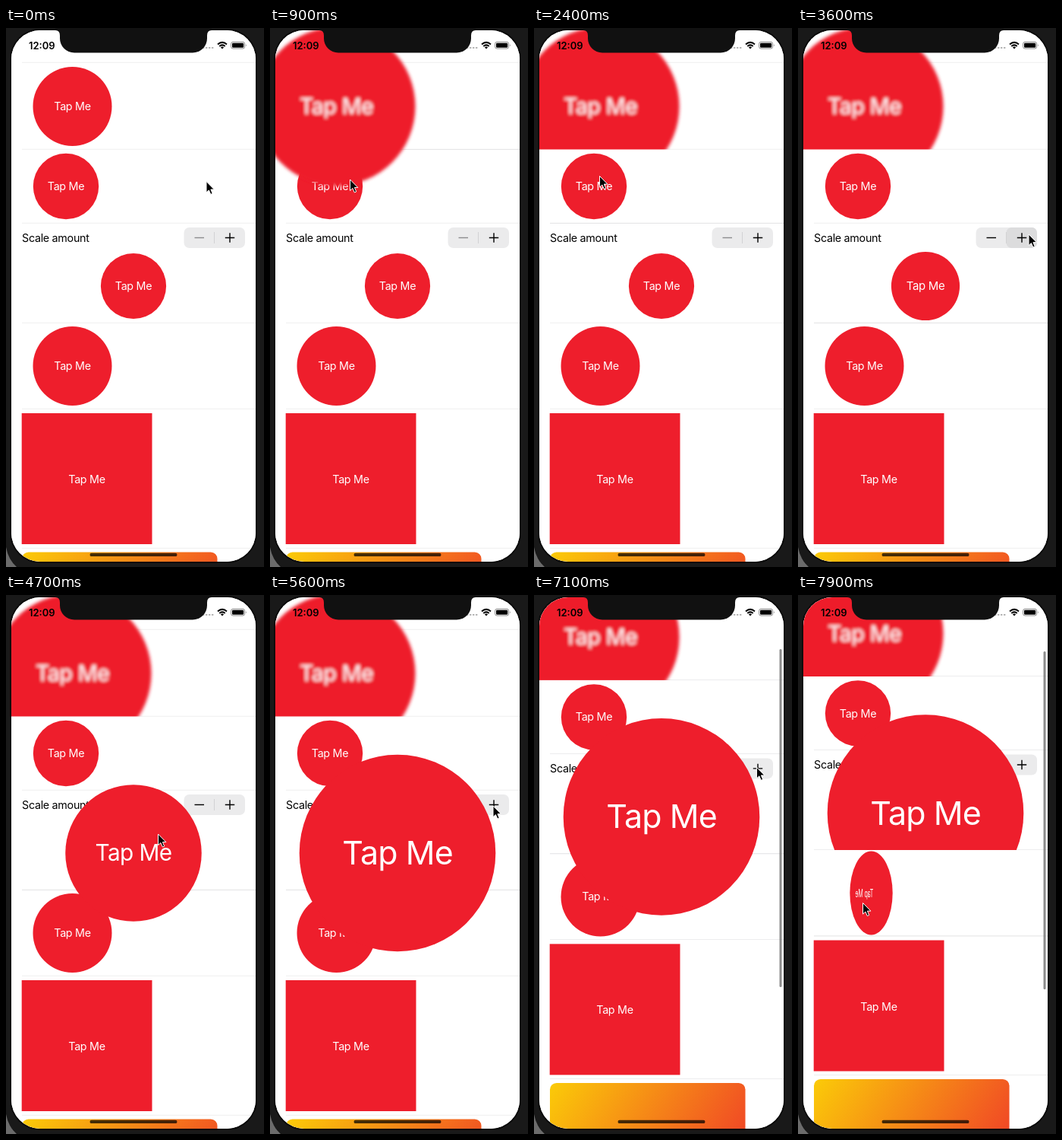
Recreate the animation shown at these times as an HTML page. Size 340 px wide and 708 px high, loop 8000 ms.

```html
<!DOCTYPE html>
<html lang="en">
<head>
<meta charset="utf-8">
<title>Tap Me</title>
<style>
  html, body { margin: 0; width: 100%; height: 100%; overflow: hidden; background: #191919; }
  svg { display: block; width: 340px; height: 708px; }
  text { font: 400 14.3px Inter, Roboto, sans-serif; letter-spacing: -.02em; }
  .tap { fill: #fff; text-anchor: middle; }
  .red { fill: #ee1e2c; }
  .time { font-weight: 600; font-size: 13px; letter-spacing: 0; }
</style>
</head>
<body>
<svg viewBox="0 0 340 708">
  <defs>
    <clipPath id="screen"><rect x="7" y="3" width="322" height="698" rx="38"/></clipPath>
    <filter id="soften" x="-30%" y="-30%" width="160%" height="160%">
      <feGaussianBlur id="blur" stdDeviation="0"/>
    </filter>
    <linearGradient id="sunset" gradientUnits="userSpaceOnUse" x1="21" y1="688.5" x2="278" y2="860">
      <stop stop-color="#fbcb08"/><stop offset="1" stop-color="#ee2a2c"/>
    </linearGradient>
  </defs>
  <rect width="340" height="708" fill="#191919"/>
  <path d="M0 682Q3 698 14 708H0Z" fill="#6b6b6b"/>
  <rect x="5" y="1" width="326" height="702" rx="40" fill="#0b0b0b"/>
  <g clip-path="url(#screen)">
    <rect width="340" height="708" fill="#fff"/>
    <g id="list"></g>
    <rect id="scroller" x="323.5" width="3" rx="1.5" fill="#777"/>
    <g id="status">
      <text class="time" x="30" y="27.5">12:09</text>
      <path d="M259 26h15" stroke="#b5b5b5" stroke-width="2.2" stroke-dasharray="2.4 1.6"/>
      <g fill="none" stroke="#000" stroke-width="2">
        <path d="M279 21.4Q285 16.4 291 21.4M281.3 24Q285 20.8 288.7 24"/>
      </g>
      <path d="M285 27.6L282.9 25.4Q285 23.7 287.1 25.4Z"/>
      <rect x="296.6" y="18.3" width="18" height="8.8" rx="2.5" fill="none" stroke="#000" stroke-opacity=".45"/>
      <rect x="298" y="19.7" width="15.2" height="6" rx="1.3"/>
      <path d="M316 21.2q1.6 1.5 0 3z" fill-opacity=".5"/>
    </g>
    <rect x="110.5" y="689.7" width="115" height="4.4" rx="2.2" fill-opacity=".72"/>
  </g>
  <path d="M65 0V3q6 0 6 7v3a19 19 0 0 0 19 19.5H246a19 19 0 0 0 19-19.5v-3q0-7 6-7V0Z" fill="#111"/>
  <path id="cursor" d="M0 0V14.6L3.4 11.5L5.8 17L8.2 16L5.9 10.6H10.4Z" stroke="#fff" stroke-width="1" stroke-linejoin="round"/>
</svg>
<script>
const LOOP = 8000;
const $ = id => document.getElementById(id);
const clamp = v => Math.max(0, Math.min(1, v));

// cubic-bezier(.42, 0, .58, 1)
function easeInOut(p) {
  p = clamp(p);
  let lo = 0, hi = 1;
  for (let i = 0; i < 20; i++) {
    const u = (lo + hi) / 2, v = 1 - u;
    if (1.26 * u * v * v + 1.74 * u * u * v + u * u * u < p) lo = u; else hi = u;
  }
  return lo * lo * (3 - 2 * lo);
}

// Interpolating spring with stiffness 5 and damping 1
function spring(s) {
  if (s <= 0) return 0;
  const w = Math.sqrt(4.75);
  return 1 - Math.exp(-s / 2) * (Math.cos(w * s) + Math.sin(w * s) / (2 * w));
}

// Keys are [time, ...values]
function along(keys, t) {
  let i = 0;
  while (i < keys.length - 2 && t >= keys[i + 1][0]) i++;
  const [a, b] = [keys[i], keys[i + 1]];
  const p = easeInOut((t - a[0]) / (b[0] - a[0]));
  return a.slice(1).map((v, k) => v + (b[k + 1] - v) * p);
}

const label = '<text class="tap" y="5">Tap Me</text>';
const button = (id, x, y, r) =>
  `<g id="${id}" transform="translate(${x} ${y})"><circle class="red" r="${r}"/>${label}</g>`;

const stepper = `
  <text x="21" y="280.5">Scale amount</text>
  <rect x="234.5" y="262" width="80.5" height="27" rx="7" fill="#ebebec"/>
  <rect id="pressed" x="274.5" y="262" width="40.5" height="27" rx="7" fill="#dcdcdd"/>
  <path d="M274.5 268v15" stroke="#d2d2d4"/>
  <path id="minus" d="M248.5 275.5h12.5" stroke-width="1.4"/>
  <path d="M288.8 275.5h12.4M295 269.3v12.4" stroke="#000" stroke-width="1.4"/>`;

const spin = `
  <ellipse id="disc" class="red"/>
  <g id="spinLabel">${label}</g>`;

const rows = [
  { top: -60, bottom: 45.5, body: '' },
  { top: 45.5, bottom: 159.5, tap: 430, body: `<g filter="url(#soften)">${button('grow', 87.5, 103, 52)}</g>` },
  { top: 159.5, bottom: 256.5, tap: 1300, body: button('still', 79, 208, 43.2) },
  { top: 256.5, bottom: 387.5, tap: 3450, body: stepper + button('scaled', 168, 339, 43.1) },
  { top: 387.5, bottom: 500.5, tap: 7500, body: spin },
  { top: 500.5, bottom: 683.5, body: `<rect class="red" x="20.7" y="506" width="171.8" height="172"/>
    <g transform="translate(106.5 593)">${label}</g>` },
  { top: 683.5, bottom: 870, body: '<rect x="21" y="688.5" width="257.5" height="171.5" rx="8.6" fill="url(#sunset)"/>' }
];

for (const row of rows) {
  row.node = document.createElementNS('http://www.w3.org/2000/svg', 'g');
  row.node.innerHTML = `<rect x="7" y="${row.top}" width="322" height="${row.bottom - row.top}" fill="#fff"/>
    <path d="M21 ${row.bottom - .1}H329" stroke="#e2e2e4"/>${row.body}`;
  $('list').append(row.node);
}

// The row tapped last lies above the others
let stacking = -1;
function stackRows(t) {
  const tapped = rows.filter(r => r.tap <= t);
  if (tapped.length === stacking) return;
  stacking = tapped.length;
  const rest = rows.filter(r => !tapped.includes(r));
  $('list').append(...[...rest, ...tapped].map(r => r.node));
}

const cursorKeys = [
  [0, 264, 201.5], [60, 264, 201.5], [400, 98, 128], [560, 98, 128], [880, 105.5, 199],
  [960, 105.5, 199], [1250, 86.5, 194.5], [2650, 86.5, 194.5], [3300, 304, 271],
  [3620, 304, 271], [4400, 200.5, 314], [4720, 200.5, 314], [5300, 294, 277],
  [6480, 294, 277], [6700, 295.5, 296], [7080, 295, 225], [7420, 85.5, 404.5], [LOOP, 85.5, 404.5]
];
const scrollKeys = [[0, 0], [6480, 0], [6700, 8.5], [7200, -52.5], [LOOP, -52.5]];

function set(id, attrs) {
  for (const key in attrs) $(id).setAttribute(key, attrs[key]);
}

function drawSpin(t) {
  const x = 87.5, y = 444, r = 52, depth = 142;
  const angle = 2 * Math.PI * spring((t - 7500) / 1000);
  const c = Math.cos(angle), a = r * Math.sin(angle) / depth, k = 1 - a * a;
  set('disc', { cx: x - r * c * a / k, cy: y, rx: Math.abs(r * c) / k, ry: r / Math.sqrt(k) });
  set('spinLabel', { transform: `translate(${x} ${y}) scale(${c} 1)` });
}

function draw(t) {
  stackRows(t);

  const grown = easeInOut((t - 430) / 350);
  set('grow', { transform: `translate(87.5 103) scale(${1 + grown})` });
  set('blur', { stdDeviation: 2.2 * grown });

  const scale = 1 + easeInOut((t - 3450) / 1000) + easeInOut((t - 4500) / 1000);
  set('scaled', { transform: `translate(168 339) scale(${scale})` });
  set('minus', { stroke: t < 3450 ? '#8c8c8e' : '#000' });
  set('pressed', { opacity: t > 3400 && t < 3720 ? 1 : 0 });
  drawSpin(t);

  const [offset] = along(scrollKeys, t);
  set('list', { transform: `translate(0 ${offset})` });
  set('scroller', {
    y: 41 + .63 * Math.max(0, -offset),
    height: 444 - Math.max(0, offset),
    opacity: clamp((t - 6500) / 120) * .85
  });

  const [x, y] = along(cursorKeys, t);
  set('cursor', { transform: `translate(${x} ${y})` });
}

const start = performance.now();
function tick() {
  draw((performance.now() - start) % LOOP);
  requestAnimationFrame(tick);
}
tick();
</script>
</body>
</html>
```
